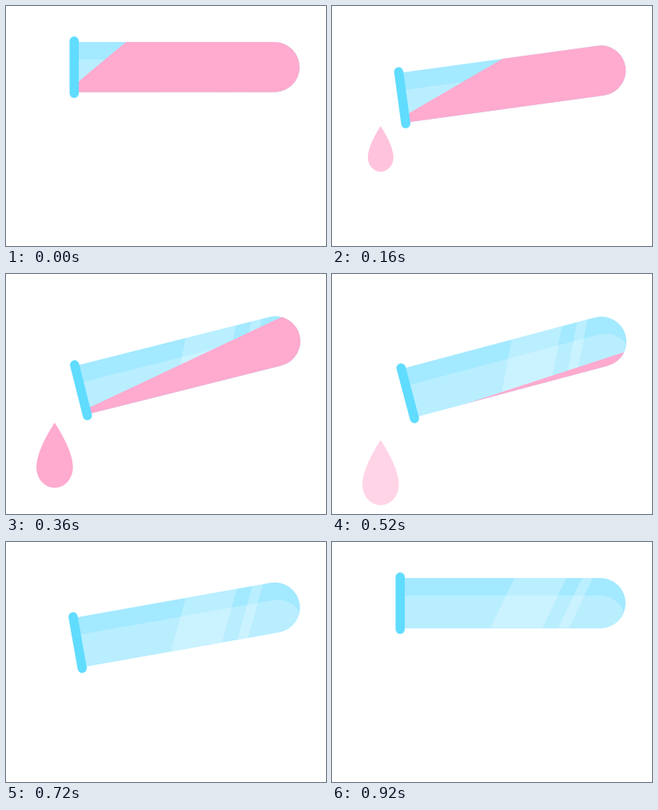
An HTML page with a canvas that plays this animation: 400 by 300 pixels, repeating every 1 s.

```html
<!DOCTYPE html>
<html lang="en">
<head>
<meta charset="utf-8">
<title>Pouring test tube</title>
<style>
  html, body { margin: 0; width: 100%; height: 100%; overflow: hidden; background: #fff; }
  canvas { display: block; width: 400px; height: 300px; }
</style>
</head>
<body>
<canvas id="stage" width="400" height="300"></canvas>
<script>
const ctx = document.getElementById('stage').getContext('2d');
const LOOP = 1000, STEP = 40;
const LEFT = 85, RIGHT = 367, MID = 76.4, R = 31.3;
const TOP = MID - R, BOTTOM = MID + R;
const RIM = '#60dcff', GLASS = '#b9eeff', SHADE = '#a3e9ff', PINK = '#ffaacf';

const clamp = v => Math.max(0, Math.min(1, v));

// Linear interpolation through [time, value] keys
function track(keys, t) {
  for (let i = 1; i < keys.length; i++) {
    const [t0, v0] = keys[i - 1], [t1, v1] = keys[i];
    if (t <= t1) return v0 + (v1 - v0) * (t - t0) / (t1 - t0);
  }
  return keys[keys.length - 1][1];
}

// Liquid surface height at the mouth and at the closed end, in tube space
const mouthLevel = [[0, 95], [360, 100], [520, 111.3], [560, 114]];
const endLevel = [[0, -136], [80, -60], [160, -17], [520, 96], [560, 108.6]];

function tilt(t) {
  const up = Math.sin(clamp(t / 460) * Math.PI / 2);
  const down = Math.cos(clamp((t - 493) / 427) * Math.PI / 2);
  return 15 * up * down * Math.PI / 180;
}

function tubePath(dy = 0) {
  ctx.beginPath();
  ctx.moveTo(LEFT, TOP + dy);
  ctx.arc(RIGHT - R, MID + dy, R, -Math.PI / 2, Math.PI / 2);
  ctx.lineTo(LEFT, BOTTOM + dy);
  ctx.closePath();
}

function fillPoly(color, ...points) {
  ctx.fillStyle = color;
  ctx.beginPath();
  points.forEach(([x, y]) => ctx.lineTo(x, y));
  ctx.fill();
}

function shine(x, width) {
  fillPoly('rgba(255,255,255,0.25)',
    [x, TOP], [x + width, TOP], [x + width - 30, BOTTOM], [x - 30, BOTTOM]);
}

function drawLiquid(t) {
  if (t >= 560) return;
  const x0 = 90, yl = track(mouthLevel, t), yr = track(endLevel, t);
  const yEnd = yr + (yr - yl) * 3 / (RIGHT - x0);
  fillPoly(PINK, [x0, yl], [RIGHT + 3, yEnd], [RIGHT + 3, 130], [x0, 130]);
}

function drawTube(t) {
  ctx.save();
  ctx.translate(RIGHT, MID);
  ctx.rotate(-tilt(t));
  ctx.translate(-RIGHT, -MID);

  ctx.save();
  tubePath();
  ctx.fillStyle = SHADE;
  ctx.fill();
  ctx.clip();
  tubePath(22);
  ctx.fillStyle = GLASS;
  ctx.fill();
  shine(228, 65);
  shine(312.5, 13.5);
  drawLiquid(t);
  ctx.restore();

  ctx.strokeStyle = RIM;
  ctx.lineWidth = 11.5;
  ctx.lineCap = 'round';
  ctx.beginPath();
  ctx.moveTo(85.2, 43.8);
  ctx.lineTo(85.2, 109.2);
  ctx.stroke();
  ctx.restore();
}

function drawDrop(t) {
  const size = clamp(t / 228);
  const alpha = size * clamp((640 - t) / 240);
  if (!alpha) return;
  ctx.save();
  ctx.globalAlpha = alpha;
  ctx.translate(60.8, 161 + 55.2 * Math.sin((t - 220) / 300));
  ctx.scale(size, size);
  ctx.fillStyle = PINK;
  ctx.beginPath();
  ctx.moveTo(0, 0);
  ctx.bezierCurveTo(9, 14, 22.8, 38, 22.8, 56);
  ctx.bezierCurveTo(22.8, 70, 12.6, 81.5, 0, 81.5);
  ctx.bezierCurveTo(-12.6, 81.5, -22.8, 70, -22.8, 56);
  ctx.bezierCurveTo(-22.8, 38, -9, 14, 0, 0);
  ctx.fill();
  ctx.restore();
}

const start = performance.now();
function draw() {
  const now = Math.max(0, performance.now() - start) % LOOP;
  const t = Math.floor(now / STEP) * STEP;
  ctx.fillStyle = '#fff';
  ctx.fillRect(0, 0, 400, 300);
  drawDrop(t);
  drawTube(t);
  requestAnimationFrame(draw);
}
draw();
</script>
</body>
</html>
```
